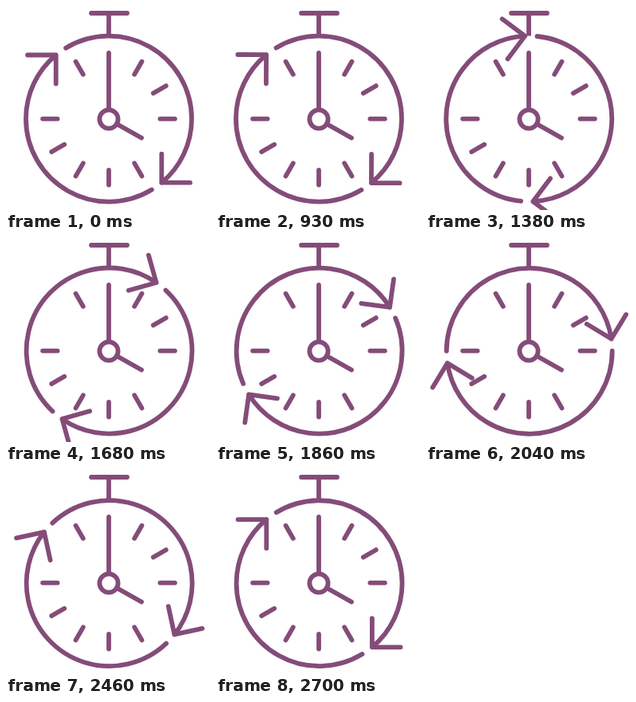
Animation of 256x256 px, one loop 3600 ms. Source, as an HTML page:

```html
<!DOCTYPE html>
<html>
<head>
<meta charset="utf-8">
<title>Stopwatch</title>
<style>
  html, body { margin: 0; width: 100%; height: 100%; overflow: hidden; background: #fff; }
  svg { display: block; width: 100vw; height: 100vh; }
</style>
</head>
<body>
<svg viewBox="0 0 256 256" fill="none" stroke="#844c79" stroke-width="5.8" stroke-linecap="round" stroke-linejoin="round">
  <path d="M107 9H152"/>
  <path d="M129 9V37.5" stroke-linecap="butt"/>
  <path d="M129 59V130M139 148L170 165.5"/>
  <circle cx="129" cy="142" r="11.6"/>
  <g id="ticks"></g>
  <g id="ring">
    <path id="half" d="M-53.9 -88.9A104 104 0 0 1 104 0A104 104 0 0 1 66.3 80.1M66.3 44V80.1H102"/>
    <use href="#half" transform="rotate(180)"/>
  </g>
</svg>
<script>
const LOOP = 3600, START = 900, SPIN = 1800, STEP = 30;
const EASE_X = 0.24;
const ring = document.getElementById('ring');

// Hours 12, 4 and 10 carry no mark.
document.getElementById('ticks').innerHTML = [1, 2, 3, 5, 6, 7, 8, 9, 11]
  .map(h => `<path d="M129 77.2V58.7" transform="rotate(${h * 30} 129 141.6)"/>`)
  .join('');

// cubic-bezier(EASE_X, 0, 1 - EASE_X, 1), solved by bisection
function ease(x) {
  if (x <= 0) return 0;
  if (x >= 1) return 1;
  let lo = 0, hi = 1, s;
  for (let i = 0; i < 24; i++) {
    s = (lo + hi) / 2;
    const r = 1 - s;
    if (3 * s * r * (EASE_X * r + (1 - EASE_X) * s) + s ** 3 < x) lo = s;
    else hi = s;
  }
  return s * s * (3 - 2 * s);
}

function draw() {
  const t = Math.floor(performance.now() % LOOP / STEP) * STEP;
  const angle = 180 * ease((t - START) / SPIN);
  ring.setAttribute('transform', `rotate(${angle} 129.3 141.9) translate(129 141.6)`);
  requestAnimationFrame(draw);
}
draw();
</script>
</body>
</html>
```
